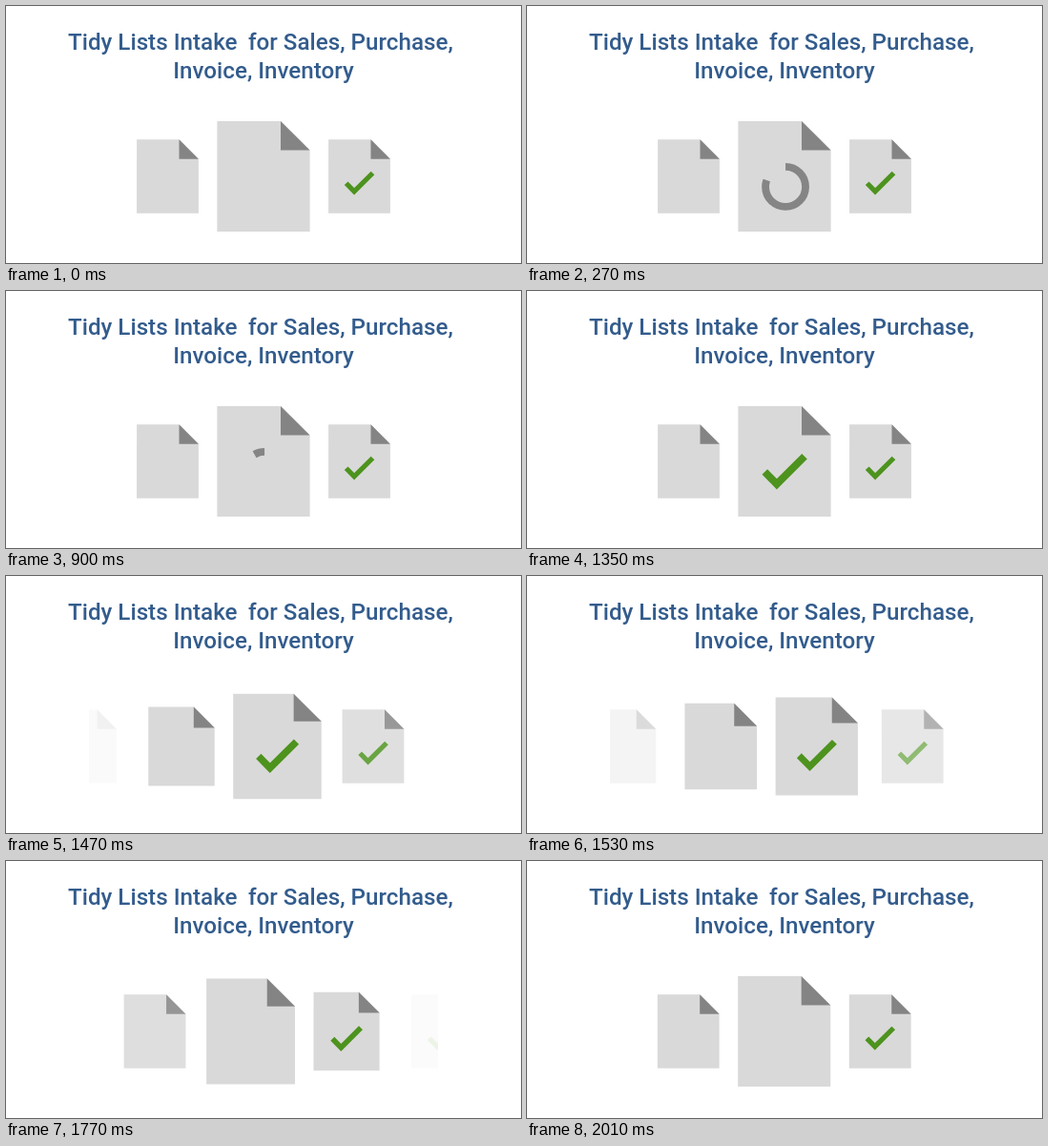
An HTML page that plays this animation: 540 by 270 pixels, repeating every 2040 ms.

```html
<!DOCTYPE html>
<html lang="en">
<head>
<meta charset="utf-8">
<title>Document import</title>
<style>
  html, body { margin: 0; width: 100%; height: 100%; overflow: hidden; background: #fff; }
  svg { display: block; width: 540px; height: 270px; }
  text { font: 500 24.2px Roboto, Inter, sans-serif; fill: #335c8d; }
  .mark { fill: none; stroke-width: 5.2; }
  .ring { stroke: #858585; }
  .check { stroke: #4d931e; }
</style>
</head>
<body>
<svg viewBox="0 0 540 270">
  <defs>
    <clipPath id="strip"><rect x="87" y="100" width="366" height="160"/></clipPath>
    <g id="page">
      <path fill="#d9d9d9" d="M-32.4-38.7H12L32.4-18.3V38.7H-32.4Z"/>
      <path fill="#848484" d="M12-38.7L32.4-18.3H12Z"/>
    </g>
    <path id="tick" pathLength="1" d="M-13.8 7.3L-5.4 15.9L14-3.5"/>
  </defs>
  <text x="65" y="46">Tidy Lists Intake</text>
  <text x="254" y="46">for Sales, Purchase,</text>
  <text x="270" y="76" text-anchor="middle">Invoice, Inventory</text>
  <g clip-path="url(#strip)">
    <g class="doc"><use href="#page"/></g>
    <g class="doc"><use href="#page"/></g>
    <g class="doc">
      <use href="#page"/>
      <path id="ring" class="mark ring" pathLength="1" d="M.7-6.7a14 14 0 0 1 0 28a14 14 0 0 1 0-28"/>
      <use id="drawn" class="mark check" href="#tick"/>
    </g>
    <g class="doc"><use href="#page"/><use class="mark check" href="#tick"/></g>
  </g>
</svg>
<script>
const LOOP = 2040;
const docs = document.querySelectorAll('.doc');
const ring = document.getElementById('ring');
const drawn = document.getElementById('drawn');

// cubic-bezier(.25, .1, .25, 1)
function ease(x) {
  if (x <= 0) return 0;
  if (x >= 1) return 1;
  const curve = (a, b, u) => 3 * a * u * (1 - u) ** 2 + 3 * b * u * u * (1 - u) + u ** 3;
  let lo = 0, hi = 1;
  for (let i = 0; i < 24; i++) {
    const mid = (lo + hi) / 2;
    if (curve(.25, .25, mid) < x) lo = mid; else hi = mid;
  }
  return curve(.1, 1, lo);
}

const phase = (t, start, length) => ease((t - start) / length);

// Shows only the part of a path between two fractions of its length
function trim(el, from, to) {
  el.style.strokeDasharray = `0 ${from} ${to - from} 2`;
  el.style.visibility = to - from > .001 ? 'visible' : 'hidden';
}

function render(t) {
  trim(ring, phase(t, 735, 255), phase(t, 0, 540));
  trim(drawn, 0, phase(t, 1050, 300));

  const slide = phase(t, 1384, 675);
  docs.forEach((doc, i) => {
    const slot = i + slide;
    const away = Math.abs(slot - 2);
    const scale = 1 + .5 * Math.max(0, 1 - away);
    const fade = Math.max(0, Math.min(1, 2 - away));
    doc.setAttribute('transform', `translate(${69 + 100.5 * slot} 179) scale(${scale})`);
    doc.setAttribute('opacity', fade ** 1.15);
  });
}

const begin = performance.now();
function tick() {
  render((performance.now() - begin) % LOOP);
  requestAnimationFrame(tick);
}
tick();
</script>
</body>
</html>
```
